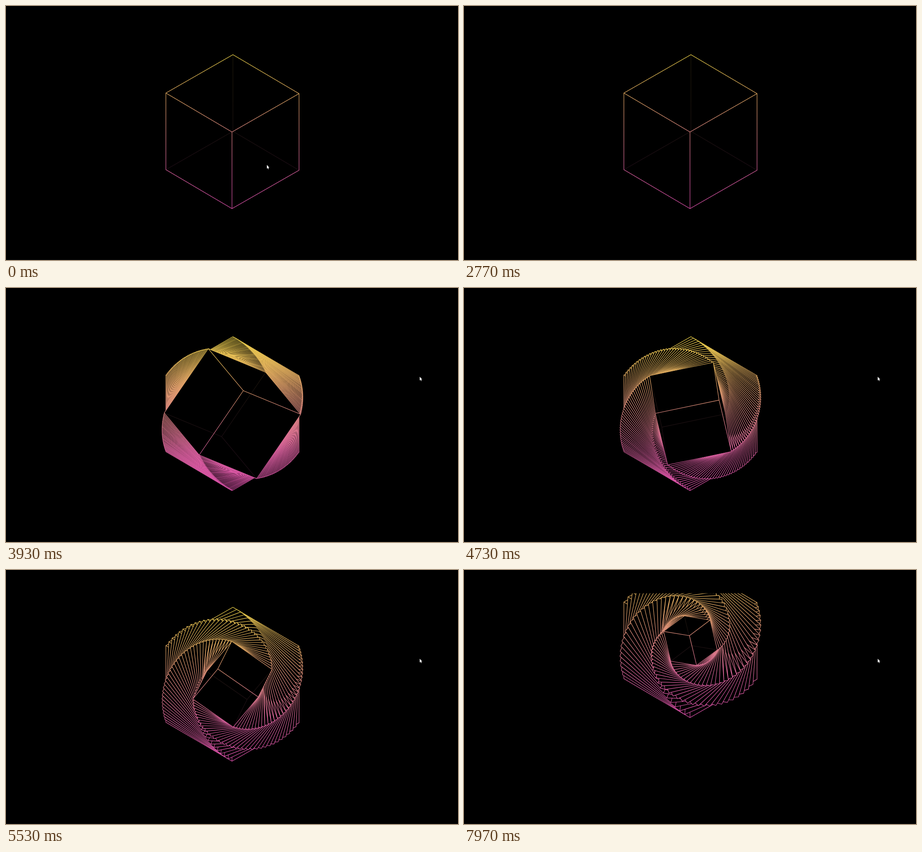
An HTML page with a canvas for the animation above (8 s loop, 998 by 561 pixels).

```html
<!DOCTYPE html>
<html>
<head>
<meta charset="utf-8">
<style>
  html, body { margin: 0; height: 100%; overflow: hidden; background: #000; }
  canvas { display: block; }
</style>
</head>
<body>
<canvas id="stage" width="998" height="561"></canvas>
<script>
const ctx = document.getElementById('stage').getContext('2d');
const LOOP = 8000, COPIES = 36, SIZE = 207.9, CX = 500, CY = 277.5;
const HEADER = 51.5;                       // content scrolls under this line
const RAD = Math.PI / 180;
const TILT = -35.5 * RAD, sa = Math.sin(TILT), ca = Math.cos(TILT);

// time, scroll progress, speed per ms
const scrollKeys = [
  [3000, 0, 0.0001], [3930, 0.208, 0.00028], [4730, 0.439, 0.00029],
  [5530, 0.676, 0.00034], [6125, 0.914, 0.0003]
];
// time, tip x, tip y
const cursorKeys = [
  [270, 576, 351], [970, 690, 196], [1630, 690, 195], [2100, 938, 195],
  [2810, 938, 195], [3300, 913.5, 196]
];

const gradient = ctx.createLinearGradient(0, 108, 0, 447);
[[0, '#ead048'], [0.25, '#e4ac62'], [0.5, '#de8682'], [0.75, '#da609e'], [1, '#d84ea8']]
  .forEach(([at, color]) => gradient.addColorStop(at, color));

function progress(t) {
  const last = scrollKeys[scrollKeys.length - 1];
  if (t <= scrollKeys[0][0]) return 0;
  if (t >= last[0]) return last[1];
  const i = scrollKeys.findIndex(k => k[0] > t);
  const [t0, p0, v0] = scrollKeys[i - 1], [t1, p1, v1] = scrollKeys[i];
  const d = t1 - t0, u = (t - t0) / d, w = 1 - u;
  return w * w * ((1 + 2 * u) * p0 + u * d * v0) + u * u * ((3 - 2 * u) * p1 - w * d * v1);
}

function cursorAt(t) {
  const i = cursorKeys.findIndex(k => k[0] > t);
  if (i === 0) return cursorKeys[0].slice(1);
  if (i < 0) return cursorKeys[cursorKeys.length - 1].slice(1);
  const [t0, x0, y0] = cursorKeys[i - 1], [t1, x1, y1] = cursorKeys[i];
  const u = (t - t0) / (t1 - t0), e = u * u * (3 - 2 * u);
  return [x0 + (x1 - x0) * e, y0 + (y1 - y0) * e];
}

// Cube edges as seen from the nearest corner, after rotateX rotateY rotateZ
function cubeEdges(u) {
  const b = (44.6 - 90 * u) * RAD, c = 180 * u * RAD, size = SIZE * (1 - 0.7 * u);
  const sb = Math.sin(b), cb = Math.cos(b), sc = Math.sin(c), cc = Math.cos(c);
  return [
    [cb * cc, ca * sc + sa * sb * cc, sa * sc - ca * sb * cc],
    [-cb * sc, ca * cc - sa * sb * sc, sa * cc + ca * sb * sc],
    [sb, -sa * cb, ca * cb]
  ].map(([x, y, z]) => {
    const k = z > 0 ? -size : size;
    return [x * k, y * k];
  });
}

const add = (...points) => points.reduce(([x, y], [dx, dy]) => [x + dx, y + dy], [0, 0]);

function polygon(points) {
  points.forEach(([x, y], i) => ctx[i ? 'lineTo' : 'moveTo'](CX + x, CY + y));
  ctx.closePath();
}

function drawCube(u, showBack) {
  const edges = cubeEdges(u), [sx, sy] = add(...edges);
  const near = [-sx / 2, -sy / 2], far = [sx / 2, sy / 2];
  ctx.beginPath();
  edges.forEach((a, i) => {
    const b = edges[(i + 1) % 3];
    polygon([near, add(near, a), add(near, a, b), add(near, b)]);
  });
  ctx.fill();
  ctx.stroke();
  if (!showBack) return;
  ctx.globalAlpha = 0.13;
  ctx.beginPath();
  edges.forEach(([x, y]) => polygon([far, [far[0] - x, far[1] - y]]));
  ctx.stroke();
  ctx.globalAlpha = 1;
}

function drawCursor([x, y]) {
  ctx.beginPath();
  [[0, 0], [0, 8.2], [1.8, 6.6], [3, 9.6], [4.3, 9], [3.1, 6.2], [5.4, 6]]
    .forEach(([dx, dy]) => ctx.lineTo(x + dx, y + dy));
  ctx.closePath();
  ctx.fillStyle = '#fff';
  ctx.fill();
}

function draw(t) {
  const p = progress(t), copies = p ? COPIES : 0;
  ctx.fillStyle = '#000';
  ctx.fillRect(0, 0, 998, 561);
  ctx.save();
  ctx.beginPath();
  ctx.rect(0, HEADER, 998, 561);
  ctx.clip();
  ctx.translate(0, -405 * Math.max(0, p - 0.614));
  ctx.strokeStyle = gradient;
  ctx.lineWidth = 1.15;
  ctx.lineJoin = 'round';
  for (let i = 0; i <= copies; i++) drawCube(copies && p * i / copies, i === copies);
  ctx.restore();
  ctx.fillStyle = '#0e0e0e';
  ctx.fillRect(0, 560, 998, 1);
  if (t < 2770 || t >= 2810) drawCursor(cursorAt(t));
}

function frame() {
  draw(performance.now() % LOOP);
  requestAnimationFrame(frame);
}
frame();
</script>
</body>
</html>
```
